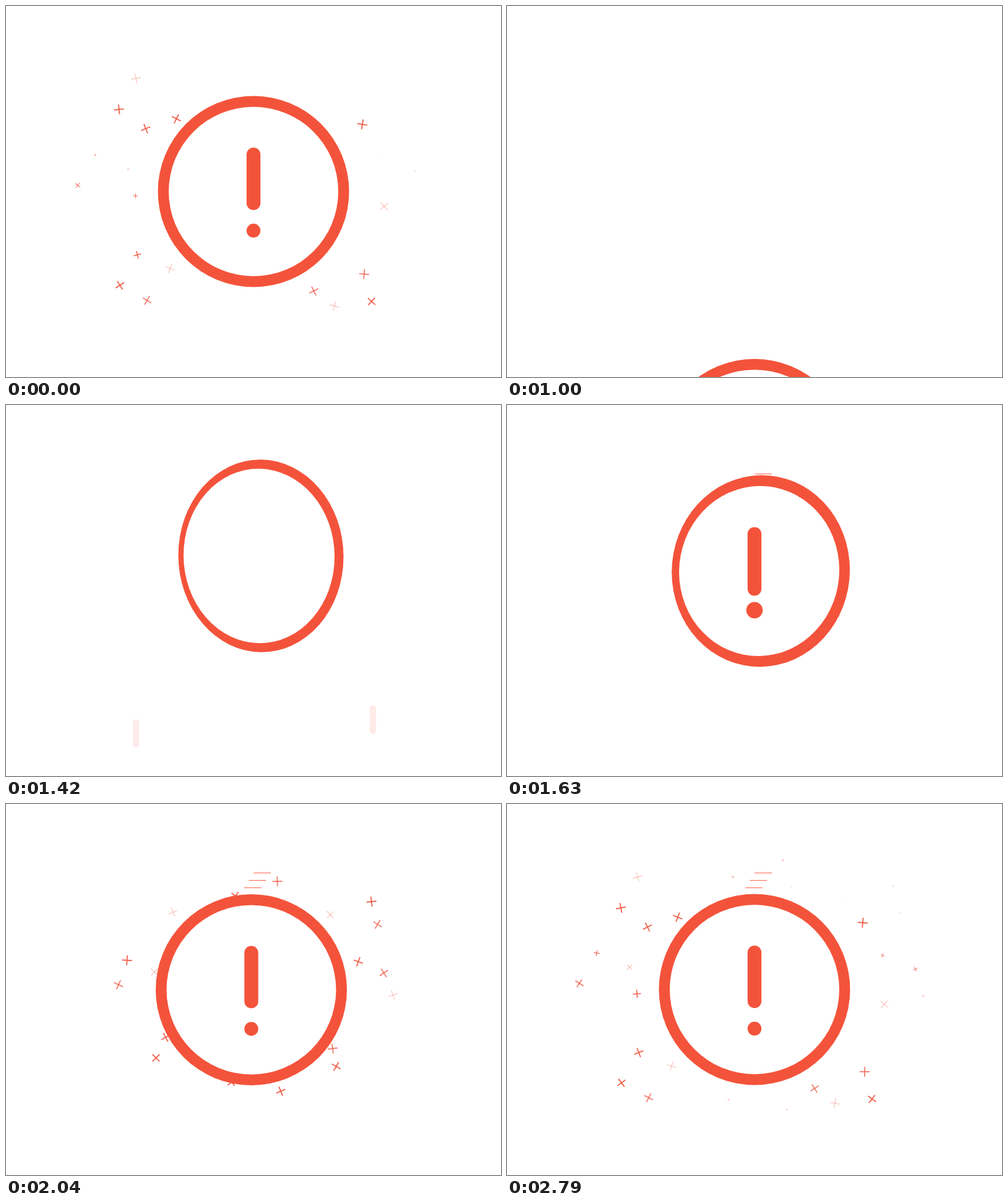
An HTML page with a canvas that plays this animation: 800x600 px, repeating every 2.83 s.

```html
<!DOCTYPE html>
<html lang="en">
<head>
<meta charset="utf-8">
<title>Alert</title>
<style>
html, body { margin: 0; width: 100%; height: 100%; overflow: hidden; background: #fff; }
canvas { display: block; }
</style>
</head>
<body>
<canvas id="stage" width="800" height="600"></canvas>
<script>
const ctx = document.getElementById('stage').getContext('2d');
const { PI, exp, sin, sqrt } = Math;
const LOOP = 2830, STEP = 1000 / 24;
const RED = '#f4533b', DARK = '#d2452f', SPARK = '#ee5842';
const CX = 400, CY = 300;
const APPEAR = 1208, LAND = 1750;

// Where each spark drifts to, from the centre; the first ones vanish first.
const sparks = [
  [146, -142], [224, -167], [236, -124], [52, 194], [59, -166], [-42, 178],
  [46, -209], [-35, -182], [273, 11], [207, -55], [260, -33], [-255, -59],
  [-202, -36], [-190, 7], [-283, -10], [-187, 102], [-134, 124], [-215, 151],
  [178, 133], [190, 177], [-189, -182], [-124, -117], [97, 160], [175, -108],
  [210, 24], [-216, -132], [-171, 175], [-173, -101], [130, 184]
];

const clamp = v => Math.min(1, Math.max(0, v));

function line(x1, y1, x2, y2, width, color, cap = 'butt') {
  ctx.lineWidth = width;
  ctx.strokeStyle = color;
  ctx.lineCap = cap;
  ctx.beginPath();
  ctx.moveTo(x1, y1);
  ctx.lineTo(x2, y2);
  ctx.stroke();
}

function disc(x, y, w, h, shear, color) {
  ctx.save();
  ctx.transform(w, shear, 0, sqrt(h * h - shear * shear), x, y);
  ctx.beginPath();
  ctx.arc(0, 0, 1, 0, 2 * PI);
  ctx.restore();
  ctx.fillStyle = color;
  ctx.fill();
}

function drawSparks(t) {
  const left = 1.48 * exp(-0.0027 * (t - 2375)) - 0.48;
  sparks.forEach(([x, y], i) => {
    const end = 2810 + 0.0944 * i ** 2.61;
    const size = 8 * clamp((end - t) / 115);
    if (!size) return;
    const pale = i % 4 === 0;
    const reach = 1 - (0.047 + 0.00013 * i * i) * left;
    const width = Math.min(pale ? 1.2 : 1.9, size / 4);
    ctx.save();
    ctx.globalAlpha = pale ? 0.36 : i % 4 === 2 ? 0.72 : 0.9;
    ctx.translate(CX + x * reach, CY + y * reach);
    ctx.rotate((i * 37 + 0.13 * (t - 2375)) * PI / 180);
    line(-size, 0, size, 0, width, SPARK);
    line(0, -size, 0, size, width, SPARK);
    ctx.restore();
  });
}

// Two bars on each side, dropping as the ring shoots up.
function drawStreaks(t) {
  for (const inner of [0, 1]) {
    for (const right of [0, 1]) {
      const x = 401.5 + (right ? 1 : -1) * (213.8 - 22.4 * inner);
      const y = 411 - 22.5 * right - 30 * inner + 0.72 * (t - APPEAR);
      const start = 1135 + 41 * inner + 14 * right;
      const end = 1380 + 45 * inner;
      ctx.globalAlpha = clamp((t - start) / 60) * clamp((end - t) / 70);
      line(x, y - 17.7, x, y + 17.7, 10.5, inner || right ? RED : DARK, 'round');
    }
  }
  ctx.globalAlpha = 1;
}

// Vertical offset of the ring: drop out, spring back up, land, settle.
function bounce(t) {
  if (t < 1080) return 480 * Math.max(0, (t - 840) / 170) ** 2;
  if (t < LAND) {
    const s = t - 1310;
    const entry = 4.5 * Math.max(0, APPEAR - t);
    return entry - 115.6 * exp(-s / 300) * sin(PI * s / (LAND - 1310));
  }
  return 1.3 * sin(PI * clamp((t - 1960) / 830));
}

function shake(t) {
  const s = Math.max(0, t - 2000);
  return -5 * exp(-s / 120) * sin(2 * PI * s / 164);
}

// Grows with overshoot.
function pop(t) {
  const u = clamp((t - 1450) / 310) - 1;
  return 1 + 2.7 * u ** 3 + 1.7 * u ** 2;
}

function drawMark(x, y, grow) {
  if (grow < 0.01) return;
  const length = 101 * grow, half = Math.min(11.2, length / 2);
  line(x, y - 71 + half, x, y - 71 + length - half, 2 * half, RED, 'round');
  const r = 11.2 * grow ** 1.8;
  disc(x, y + 63.3, r, r, 0, RED);
}

function drawRing(t) {
  const falling = t < 1080;
  const turn = falling ? 0 : clamp((LAND - t) / (LAND - APPEAR));
  const narrow = turn ** 0.7;
  const slide = clamp(5.4 * turn - 0.4);
  const shear = 12.5 * turn - 27 * turn * (1 - turn);
  const x = CX + shake(t), y = CY + bounce(t);
  disc(x + 12 * slide, y, 154.5 - 29.5 * narrow, 154.5 + 2 * turn, shear, RED);
  disc(x + 9 * slide, y, 137 - 21 * narrow, 137 + 11 * turn ** 2, 0.93 * shear, '#fff');
  drawMark(x, y, falling ? 1 : pop(t));
}

// Thin lines left behind above the landing ring.
function drawTrail(t) {
  for (let i = 0; i < 3; i++) {
    const x = 400 - 7.6 * i, y = 111.5 + 12 * i;
    if (t >= 1620 + i * STEP) line(x, y, x + 28, y, 0.9, RED);
  }
}

function draw(ms) {
  const t = Math.floor((ms % LOOP + 5) / STEP) * STEP;
  ctx.fillStyle = '#fff';
  ctx.fillRect(0, 0, 800, 600);
  if (t < 600) drawSparks(t + LOOP);
  else if (t > LAND) drawSparks(t);
  drawStreaks(t);
  drawRing(t);
  drawTrail(t);
}

const begin = performance.now();
function tick() {
  draw(performance.now() - begin);
  requestAnimationFrame(tick);
}
tick();
</script>
</body>
</html>
```
